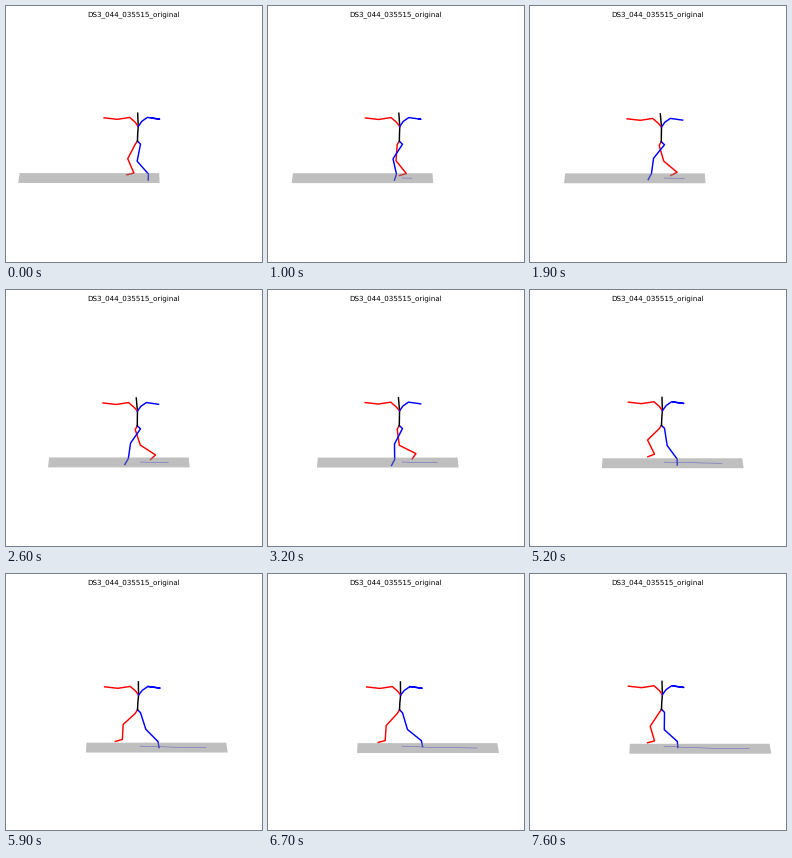
A matplotlib script that plays this animation: 256x256 px, repeating every 7.7 s.

```python
import numpy as np
import matplotlib.pyplot as plt
from matplotlib.animation import FuncAnimation

plt.rcParams["text.hinting"] = "none"

SIZE, DPI = 256, 100
FRAMES, STEP = 77, 100
PT = 72 / DPI               # points per pixel
W = 2 * np.pi / 80          # one full stride takes 80 frames


def wave(f, mean, *harmonics):
    """Angle in degrees: a mean plus (cos, sin) pairs, returned in radians."""
    a = mean
    for n, (c, s) in enumerate(harmonics, 1):
        a += c * np.cos(n * W * f) + s * np.sin(n * W * f)
    return np.radians(a)


def bone(angle, rx, ry):
    """Hanging bone, foreshortened by the camera into an ellipse."""
    return np.array([rx * np.sin(angle), ry * np.cos(angle)])


def leg(root, hip, *bones):
    return np.vstack([root, hip + np.cumsum([np.zeros(2), *bones], axis=0)])


def right_leg(f, root, hip):
    thigh = wave(f, -18.8, (-4.6, 32.3), (-3.9, -4.9))
    shin = wave(f, 29, (-19.1, 21.3), (9.5, 1), (-1.4, -2.2))
    push = (.5 + .5 * np.cos(W * (f - 34))) ** 3
    foot = np.radians(17 + 42 * push - 90)
    return leg(root, hip, bone(thigh, 16.3, 16.3), bone(shin, 20, 15),
               bone(foot, 7.3, 6.3))


def left_leg(f, root, hip):
    thigh = wave(f, -11.4, (1.5, -28.6), (-1.2, -2.5))
    shin = wave(f, 19.9, (10.4, -22.7), (4, -1.2))
    foot = np.array([-1.1 + 2.4 * np.cos(W * (f - 65)), 6])
    return leg(root, hip, bone(thigh, 17.4, 17.4), bone(shin, 20, 15.5), foot)


def pose(f):
    """Right leg, left leg, spine, right arm, left arm."""
    dx = -.65 - .85 * np.cos(W * (f - 24))
    dy = .75 - .65 * np.cos(2 * W * (f - 4))
    root = np.array([131.5 + .15 * dx, 135 + .6 * dy])
    chest = np.array([132.5 + .7 * dx, 120.4 + .5 * dy])
    spine = [root, (131.8 + .3 * dx, 128 + .6 * dy), chest,
             (132.3 + dx, 113 + dy), (132.2 + 1.3 * dx, 107 + .7 * dy)]

    right_arm = np.array([(129.4, 115.8), (124.1, 111.2),
                          (111.7, 113.1), (98.5, 111.6)])
    fold = np.clip(1 + dx / 1.2, 0, 1)
    left_arm = np.array([(136.3, 115), (141.8, 111.2), (154, 112.9),
                         (154 - 12 * fold, 112.9 - 1.6 * fold)])
    return [
        right_leg(f, root, np.array([129.2, 138 + 1.2 * dy])),
        left_leg(f, root, np.array([134.5, 138 + .6 * dy])),
        np.array(spine),
        np.vstack([chest, right_arm + (dx, dy)]),
        np.vstack([chest, left_arm + (dx, dy)]),
    ]


def drift(f):
    """Vertical slide of the ground on screen."""
    u = f / (FRAMES - 1)
    return .9 * u + 1.8 * u ** 3


def ground(f):
    top, bottom = 167.1 + drift(f), 177 + drift(f)
    return [(13.6 + 1.134 * f, top), (153.2 + 1.136 * f, top),
            (153.6 + 1.155 * f, bottom), (12.2 + 1.147 * f, bottom)]


fig = plt.figure(figsize=(SIZE / DPI, SIZE / DPI), dpi=DPI, facecolor="white")
ax = fig.add_axes([0, 0, 1, 1])
ax.set_xlim(0, SIZE)
ax.set_ylim(SIZE, 0)
ax.axis("off")

ax.text(128, 10, "DS3_044_035515_original", ha="center", va="baseline",
        family="DejaVu Sans", size=7.11 * PT, color="black")
trail, = ax.plot([], [], color="blue", lw=.38 * PT)
limbs = [ax.plot([], [], color=c, lw=1.45 * PT)[0]
         for c in ("red", "blue", "black", "red", "blue")]
floor = plt.Polygon(ground(0), closed=True, facecolor=(.5, .5, .5, .5),
                    edgecolor="none", zorder=5)
ax.add_patch(floor)


def update(f):
    past = np.arange(f)
    trail.set_data(132.8 + 1.14 * (f - past), 172 + drift(f) - drift(past))
    for line, pts in zip(limbs, pose(f)):
        line.set_data(*pts.T)
    floor.set_xy(ground(f))
    return [trail, *limbs, floor]


anim = FuncAnimation(fig, update, frames=FRAMES, interval=STEP,
                     repeat=True, repeat_delay=0)
plt.show()
```
